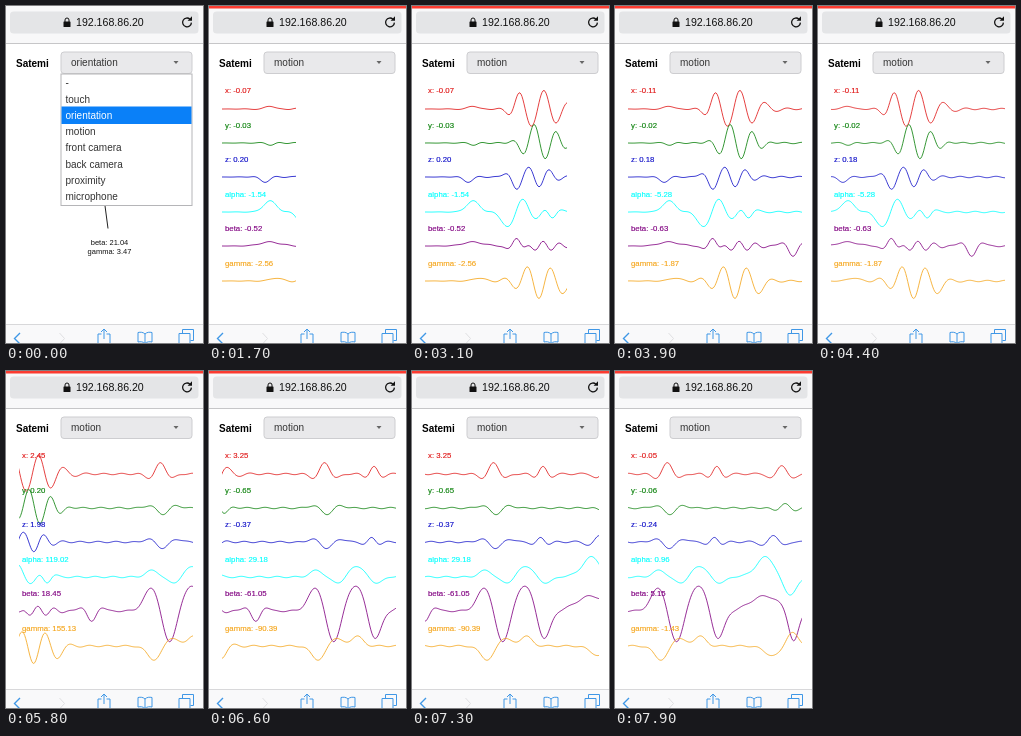
Write an HTML page that moves like this. It is 197 px wide and 337 px high and loops after 8 s.

```html
<!DOCTYPE html>
<html lang="en">
<head>
<meta charset="utf-8">
<title>Sensor plots</title>
<style>
html, body { margin: 0; width: 100%; height: 100%; overflow: hidden; background: #fff; }
svg { display: block; width: 197px; height: 337px; font-family: "Liberation Sans", Arial, sans-serif; }
.ui { font-size: 10px; fill: #333; }
.small { font-size: 7.5px; }
.labels { font-size: 7.8px; stroke-width: .15; }
.wave { fill: none; stroke-width: 1; stroke-linejoin: round; opacity: .82; }
.icon { fill: none; stroke: #3f97e6; stroke-width: 1; }
</style>
</head>
<body>
<svg viewBox="0 0 197 337">
  <defs>
    <clipPath id="window"><rect id="reveal" x="13" y="70" width="0" height="246"/></clipPath>
  </defs>
  <rect width="197" height="337" fill="#fff"/>

  <!-- address bar -->
  <rect width="197" height="37" fill="#f8f8f9"/>
  <path d="M0 37.5H197" stroke="#c6c6c8"/>
  <rect id="recording" width="197" height="2.5" fill="#fb3b30"/>
  <rect x="4" y="5.5" width="188.500" height="22" rx="3.500" fill="#e4e5e7"/>
  <rect x="57.500" y="15.500" width="7" height="5.500" rx=".6" fill="#111"/>
  <path d="M59 16v-2a2 2 0 0 1 4 0v2" fill="none" stroke="#111"/>
  <text x="70" y="20" font-size="10.6" fill="#111">192.168.86.20</text>
  <path d="M184 13.200a4.400 4.400 0 1 0 1.400 3.400" fill="none" stroke="#111" stroke-width="1.300"/>
  <path d="M181.600 14.700h4.400v-4.400z" fill="#111"/>

  <!-- mode picker -->
  <text x="10" y="60.500" font-size="10" font-weight="bold">Satemi</text>
  <rect x="55" y="46" width="131" height="21.500" rx="3" fill="#e9e9eb" stroke="#cdcdd0"/>
  <text id="mode" class="ui" x="65" y="60.300"></text>
  <path d="M167.500 55h5l-2.500 3z" fill="#666"/>

  <g id="motion">
    <g clip-path="url(#window)"><g id="waves"></g></g>
    <g id="labels" class="labels"></g>
  </g>

  <g id="orientation">
    <path d="M98.500 196L102 222.500" stroke="#222"/>
    <g class="small" text-anchor="middle" fill="#111">
      <text x="103.500" y="238.500">beta: 21.04</text>
      <text x="103.500" y="247.500">gamma: 3.47</text>
    </g>
    <rect x="55" y="68" width="131" height="131.500" fill="#fff" stroke="#b5b5b8"/>
    <rect id="highlight" x="55.500" width="130" height="17.500" fill="#0a80f8"/>
    <g id="options" class="ui"></g>
  </g>

  <!-- toolbar -->
  <rect y="318" width="197" height="19" fill="#f9f9fa"/>
  <path d="M0 318.500H197" stroke="#d8d8da"/>
  <g class="icon">
    <path d="M14 327l-5.500 5.500 5.500 5.500" stroke-width="1.400"/>
    <path d="M53.500 327l5 5.500-5 5.500" stroke="#e0e0e2"/>
    <path d="M95.500 328H92v10h12V328h-3.500M98 333v-10M95 326l3-3 3 3"/>
    <path d="M139 328c-2-2-4.500-2-7-1.500V336c2.500-.5 5-.5 7 1.500 2-2 4.500-2 7-1.500v-9.500c-2.500-.5-5-.5-7 1.500zV337"/>
    <path d="M173 327.500h11V338h-11zM176.500 327v-3.500h11v11h-3"/>
  </g>
</svg>

<script>
const LOOP = 8000, STEP = 100;
const MOTION_AT = 200;
const PEN_START = 177, PEN_SPEED = 0.0486;
const LEFT = 13, SPAN = 174, LENGTH = 376;
const FIRST_UPDATE = 3200, UPDATE_EVERY = 1500;
const OPTIONS = ['-', 'touch', 'orientation', 'motion', 'front camera',
  'back camera', 'proximity', 'microphone'];

const $ = id => document.getElementById(id);

function add(parent, tag, attrs, text = '') {
  const el = document.createElementNS('http://www.w3.org/2000/svg', tag);
  for (const key in attrs) el.setAttribute(key, attrs[key]);
  el.textContent = text;
  return parent.appendChild(el);
}

// A jolt of the phone: a bump, or with a period a swing that dies away on both sides.
const jolt = (at, height, width, period = Infinity) => s =>
  height * Math.exp(-(((s - at) / width) ** 2)) * Math.cos(2 * Math.PI * (s - at) / period);

// Slight shaking of the hand, growing from rest.
const tremor = (s, phase) => 0.7 * Math.min(1, s / 80) * Math.sin(s * 0.35 + phase);

const channels = [];
function channel(name, color, base, values, jolts) {
  const row = channels.length;
  const points = Array.from({ length: LENGTH + 1 }, (_, s) => {
    const rise = jolts.reduce((sum, j) => sum + j(s), tremor(s, row));
    return `${LEFT + s},${(base - rise).toFixed(2)}`;
  });
  add($('waves'), 'polyline', { class: 'wave', stroke: color, points: points.join(' ') });
  const label = add($('labels'), 'text', { x: 16, y: 87 + row * 34.6, fill: color, stroke: color });
  channels.push({ name, values, label });
}

channel('x', '#e01818', 103, ['-0.07', '-0.11', '2.45', '3.25', '-0.05'], [
  jolt(48, 3, 10, 40), jolt(94, 9, 11, 25), jolt(119, 19, 24, 25),
  jolt(241, 11, 13, 30), jolt(290, 7, 10, 22), jolt(355, 9, 14, 26)]);

channel('y', '#0a800a', 137, ['-0.03', '-0.02', '0.20', '-0.65', '-0.06'], [
  jolt(49, -2, 8, 30), jolt(109, 17, 16, 24), jolt(131, 9, 14, 22),
  jolt(243, -6, 16, 34), jolt(358, 4, 14, 24)]);

channel('z', '#1010c8', 171, ['0.20', '0.18', '1.98', '-0.37', '-0.24'], [
  jolt(43, -5, 9, 40), jolt(91, -11, 11, 26), jolt(114, -9, 18, 21),
  jolt(243, -6, 18, 34), jolt(288, 4, 10, 20), jolt(347, 7, 14, 26)]);

channel('alpha', 'cyan', 206, ['-1.54', '-5.28', '119.02', '29.18', '0.96'], [
  jolt(48, 11, 9), jolt(82, -9, 10), jolt(97, 14, 16, 32), jolt(127, -6, 9, 22),
  jolt(233, 6, 9), jolt(273, 11, 26, 46), jolt(339, 20, 13), jolt(363, -18, 10)]);

channel('beta', 'purple', 240, ['-0.52', '-0.63', '18.45', '-61.05', '5.15'], [
  jolt(48, 4, 14), jolt(92, 9, 10, 22), jolt(118, 4, 24, 16), jolt(172, -11, 11, 26),
  jolt(233, 25, 11), jolt(249, -34, 10), jolt(272, 26, 12), jolt(291, -29, 9),
  jolt(338, 15, 20), jolt(367, -32, 7)]);

channel('gamma', '#f5a51a', 275, ['-2.56', '-1.87', '155.13', '-90.39', '-1.43'], [
  jolt(54, 3, 8), jolt(114, -18, 24, 24), jolt(138, -6, 8), jolt(235, -14, 10),
  jolt(251, 9, 9), jolt(273, 10, 8), jolt(347, -10, 12), jolt(365, 14, 9)]);

const optionY = i => 80.3 + i * 16.25;
const options = OPTIONS.map((text, i) =>
  add($('options'), 'text', { x: 59.5, y: optionY(i) }, text));

function show(id, on) { $(id).style.display = on ? '' : 'none'; }

function draw(t) {
  const moving = t >= MOTION_AT;
  show('motion', moving);
  show('recording', moving);
  show('orientation', !moving);
  $('mode').textContent = moving ? 'motion' : 'orientation';

  const chosen = OPTIONS.indexOf(t < 100 ? 'orientation' : 'motion');
  $('highlight').setAttribute('y', optionY(chosen) - 12.3);
  options.forEach((el, i) => { el.style.fill = i === chosen ? '#fff' : ''; });

  const head = Math.max(0, (t - PEN_START) * PEN_SPEED);
  $('reveal').setAttribute('width', Math.min(head, SPAN));
  $('waves').setAttribute('transform', `translate(${-Math.max(0, head - SPAN)} 0)`);

  const reading = Math.max(0, 1 + Math.floor((t - FIRST_UPDATE) / UPDATE_EVERY));
  for (const c of channels) c.label.textContent = `${c.name}: ${c.values[reading]}`;
}

const start = performance.now();
function tick() {
  const t = (performance.now() - start) % LOOP;
  draw(Math.floor(t / STEP) * STEP);
  requestAnimationFrame(tick);
}
tick();
</script>
</body>
</html>
```
